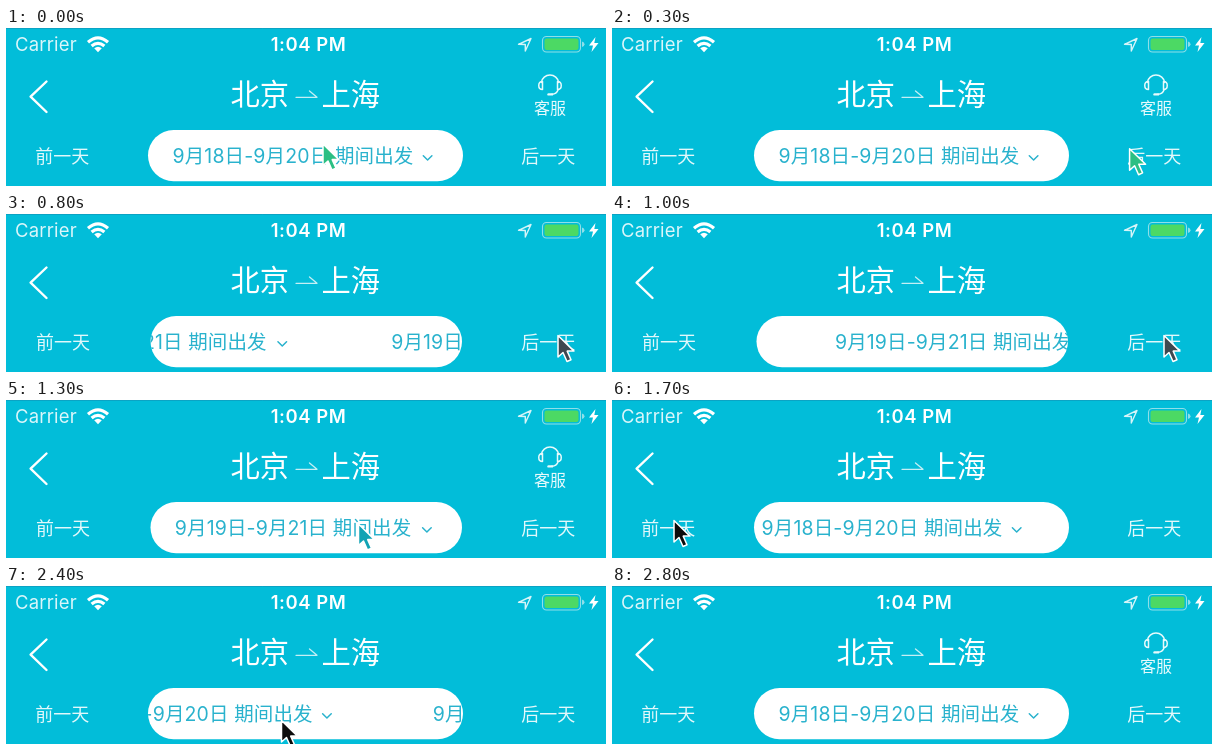
Recreate the animation shown at these times as an HTML page. Size 600 by 158 pixels, loop 2900 ms.

```html
<!DOCTYPE html>
<html lang="zh-CN">
<head>
<meta charset="utf-8">
<title>航班日期切换</title>
<style>
html, body { margin: 0; width: 100%; height: 100%; overflow: hidden; background: #02bdd9; }
svg { display: block; width: 100vw; height: 100vh; }
text { font-family: Inter, "Noto Sans CJK SC", "Noto Sans CJK", sans-serif; fill: #fff; white-space: pre; }
.line { fill: none; stroke: #fff; stroke-linecap: round; stroke-linejoin: round; }
.day { font-size: 18px; fill: #e2f8fb; }
.city { font-size: 29.3px; font-weight: 500; }
.label text { font-size: 19.5px; letter-spacing: .13px; fill: #29b2cd; }
.label path { stroke: #29b2cd; stroke-width: 1.5; }
</style>
</head>
<body>
<svg viewBox="0 0 600 158" preserveAspectRatio="none">
  <defs>
    <clipPath id="clip"><rect id="hole" y="102" height="51.2" rx="25.6"/></clipPath>
  </defs>
  <rect width="600" height="158" fill="#02bdd9"/>
  <path d="M0 .5H600" stroke="#0ba3c4"/>

  <text x="9" y="23" font-size="18.5" letter-spacing=".2" style="fill:#dcf6fa">Carrier</text>
  <g class="line" style="stroke-width:3.2;stroke-linecap:butt">
    <path d="M82 14.2Q92 5.4 102 14.2"/>
    <path d="M85.6 18Q92 12.6 98.4 18"/>
  </g>
  <path d="M88.2 20.2Q92 17.2 95.8 20.2L92 24.2Z" fill="#fff"/>
  <text x="302.5" y="23" font-size="18.5" font-weight="600" letter-spacing=".5" text-anchor="middle">1:04 PM</text>
  <path class="line" d="M512.5 16.3L525 10.5L519.3 23V16.5Z" stroke-width="1.4" style="stroke:#d5f4f8"/>
  <rect class="line" x="536.5" y="8.5" width="38" height="15.5" rx="4" stroke-width="1.1" style="stroke:#8fdfe9"/>
  <rect x="538.5" y="10.5" width="34" height="11.5" rx="2.2" fill="#4cd964"/>
  <path d="M576 13.5Q578.5 14.2 578.5 16.2T576 19Z" fill="#8fdfe9"/>
  <path d="M589.5 9L583 17.5H587L585.5 24L592.5 15H588.3Z" fill="#fff"/>

  <path class="line" d="M40.5 53.5L24.6 68.7L40.5 84" stroke-width="2.4"/>
  <text class="city" x="224.5" y="77">北京</text>
  <path class="line" d="M290 69.3H311L303.5 63" stroke-width="1.3" style="stroke:#c5eff5"/>
  <text class="city" x="315.5" y="77">上海</text>

  <g id="help">
    <g class="line" stroke-width="1.5" style="stroke:#e8fafc">
      <path d="M535.3 54.5A8.8 8.8 0 0 1 552.7 54.5"/>
      <path d="M536.5 53.5C531.5 53.5 531.5 61.5 536.5 61.5ZM551.5 53.5C556.5 53.5 556.5 61.5 551.5 61.5Z"/>
      <path d="M552 62Q550.5 66 546 66.3"/>
      <path d="M542.5 66.4H546" stroke-width="2.4"/>
    </g>
    <text x="544" y="86" font-size="16" text-anchor="middle" style="fill:#e8fafc">客服</text>
  </g>

  <text id="prev" class="day" y="134.5">前一天</text>
  <text class="day" x="515.3" y="134.5">后一天</text>

  <rect id="pill" y="102" height="51.2" rx="25.6" fill="#fff"/>
  <g clip-path="url(#clip)">
    <g class="label"><text y="135"></text><path class="line" d="M0 127.8l4.3 4.2l4.3 -4.2"/></g>
    <g class="label"><text y="135"></text><path class="line" d="M0 127.8l4.3 4.2l4.3 -4.2"/></g>
  </g>
  <path id="cursor" d="M0 0V21.5L5 17L9 26L13 24.2L9.2 15.6H16Z" stroke="#fff" stroke-width="1.5" stroke-linejoin="round"/>
</svg>
<script>
const $ = id => document.getElementById(id);
const labels = [...document.querySelectorAll('.label')];
const LOOP = 2900, STEP = 100, PITCH = 361;

// Marquee runs: start, length of one turn, turns
const runs = [[519, 644, 1], [1620, 576, 2]];

// Pointer stops: time, x, y
const stops = [
  [0, 317, 116], [400, 552, 121.5], [1050, 552, 121.5], [1300, 352.5, 124],
  [1450, 210, 136], [1600, 62, 120.5], [2150, 62, 120.5], [2400, 275.5, 134.5], [2550, 300, 162]
];

const ease = u => (1 - Math.cos(Math.PI * u)) / 2;

function pointer(t) {
  const i = stops.findIndex(s => s[0] > t);
  if (i < 0) return null;
  const [t0, x0, y0] = stops[i - 1], [t1, x1, y1] = stops[i];
  const k = ease((t - t0) / (t1 - t0));
  return [x0 + (x1 - x0) * k, y0 + (y1 - y0) * k];
}

function scroll(t) {
  for (const [start, len, turns] of runs) {
    const u = (t - start) / len;
    if (u >= 0 && u < turns) return { busy: true, shift: PITCH * ease(u % 1) };
  }
  return { busy: false, shift: 0 };
}

function draw(t) {
  const next = t >= runs[0][0] && t < runs[1][0];
  const { busy, shift } = scroll(t);
  const left = next ? 144.5 : 142, width = next ? 311.5 : 315;
  for (const id of ['pill', 'hole']) {
    $(id).setAttribute('x', left);
    $(id).setAttribute('width', width);
  }
  $('prev').setAttribute('x', next ? 30 : 29.2);
  $('help').style.display = busy ? 'none' : '';

  const x = (next ? 168.8 : 166.5) - shift;
  labels.forEach((g, i) => {
    const [text, arrow] = g.children;
    text.textContent = next ? '9月19日-9月21日 期间出发' : '9月18日-9月20日 期间出发';
    arrow.setAttribute('transform', `translate(${next ? 247.8 : 250.8})`);
    g.setAttribute('transform', `translate(${x + i * PITCH})`);
  });

  const p = pointer(t), c = $('cursor');
  c.style.display = p ? '' : 'none';
  if (p) {
    c.setAttribute('transform', `translate(${p[0]} ${p[1]})`);
    c.setAttribute('fill', busy ? (next ? '#3f4850' : '#0c0c0c') : next ? '#12a3b4' : '#2bbf83');
  }
}

const origin = performance.now();
function tick() {
  const t = (performance.now() - origin) % LOOP;
  draw(Math.floor(t / STEP) * STEP);
  requestAnimationFrame(tick);
}
draw(0);
tick();
</script>
</body>
</html>
```
